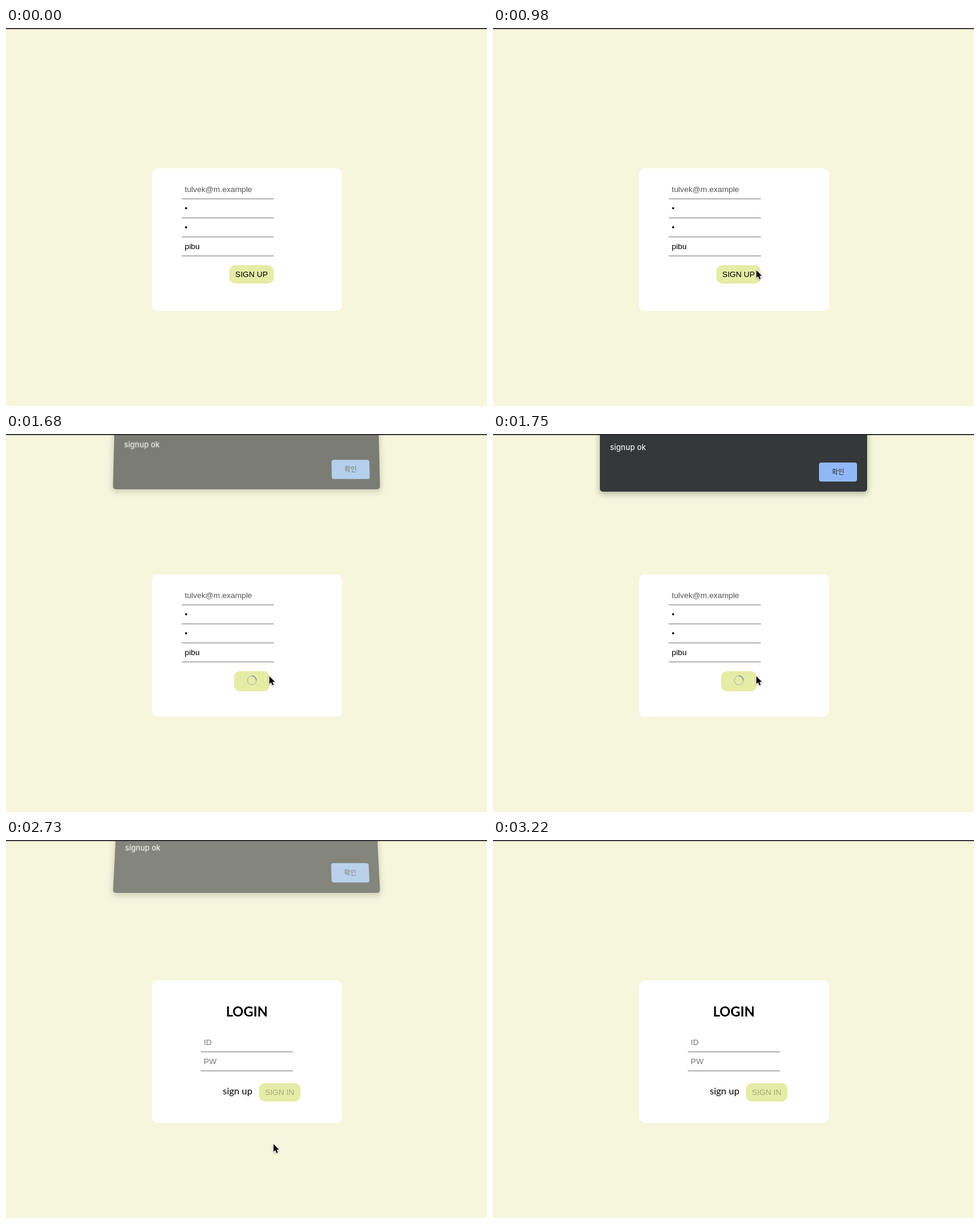
An HTML page for the animation above (4.06 s loop, 810 by 636 pixels).

```html
<!DOCTYPE html>
<html lang="ko">
<head>
<meta charset="utf-8">
<title>Sign up</title>
<style>
  html, body { margin: 0; width: 100%; height: 100%; overflow: hidden; background: #f6f6dc; }
  body { position: relative; }
  svg { position: absolute; left: 0; top: 0; display: block; }
  text { font: 13.333px "Liberation Sans", Arial, sans-serif; white-space: pre; }

  .line { fill: #767676; }
  .btn { fill: #e5eca6; }
  .muted { fill: #545454; }
  .hint { fill: #757575; }
  .off { fill: #a5aa7a; }
  .title { font: 700 22.7px Lato, sans-serif; text-anchor: middle; }
  .link { font: 16px Lato, sans-serif; }

  /* One tick is 70 ms, 58 ticks per loop */
  .signup, .login, .idle, .busy, .turn, .dialog, .cursor {
    animation: 4060ms step-end infinite;
  }
  .signup { animation-name: leave-page; }
  .login { animation-name: enter-page; }
  .idle { animation-name: leave-idle; }
  .busy { animation-name: enter-busy; }
  .turn { animation-name: turn; transform-origin: 414px 414.5px; }
  .dialog { animation-name: dialog; }
  .cursor { animation-name: cursor; }

  @keyframes leave-page { 0% { opacity: 1 } 67.24%, 100% { opacity: 0 } }
  @keyframes enter-page { 0% { opacity: 0 } 67.24%, 100% { opacity: 1 } }
  @keyframes leave-idle { 0% { opacity: 1 } 37.93%, 100% { opacity: 0 } }
  @keyframes enter-busy { 0% { opacity: 0 } 37.93%, 100% { opacity: 1 } }
  @keyframes turn { 0% { transform: rotate(-25deg) } 39.65%, 100% { transform: none } }

  .dialog {
    position: absolute; left: 180px; top: -30px; width: 450px; height: 127px;
    border-radius: 0 0 5px 5px;
    background: #282b2e;
    box-shadow: 0 3px 10px 2px rgba(0, 0, 0, .24);
    transform-origin: 50% 100%;
    --tilt: translateY(-8px) perspective(230px) rotateX(3deg) scaleY(1.035);
    --tilt-in: translateY(-4px) perspective(230px) rotateX(1.5deg) scaleY(1.017);
    --tilt-out: translateY(-14px) perspective(230px) rotateX(5deg) scaleY(1.06);
  }
  .dialog span {
    position: absolute; left: 17px; top: 42px;
    font: 500 13px/20px Inter, sans-serif; color: #e8eaed;
  }
  .dialog b {
    position: absolute; left: 369px; top: 78px; width: 64px; height: 32px;
    border-radius: 4px; background: #8ab4f8; color: #202124; text-align: center;
    font: 500 11.5px/31px "Noto Sans CJK KR", "Noto Sans CJK", sans-serif;
  }
  @keyframes dialog {
    0% { opacity: 0; transform: var(--tilt) }
    41.37% { opacity: .6; transform: var(--tilt-in) }
    43.1% { opacity: .94; transform: none }
    44.82% { opacity: .99; transform: none }
    46.55% { opacity: 1; transform: none }
    67.24% { opacity: .56; transform: var(--tilt) }
    68.96% { opacity: .12; transform: var(--tilt-out) }
    70.68%, 100% { opacity: 0; transform: var(--tilt-out) }
  }

  .cursor { filter: drop-shadow(0 1px 1px rgba(0, 0, 0, .3)); overflow: visible; }
  @keyframes cursor {
    0% { transform: translate(391px, 660px) }
    6.89% { transform: translate(391px, 610px) }
    8.62% { transform: translate(398px, 545px) }
    10.34% { transform: translate(412px, 478px) }
    12.06% { transform: translate(427px, 432px) }
    13.79% { transform: translate(438px, 411px) }
    15.51% { transform: translate(443px, 407px) }
    53.44% { transform: translate(443px, 410px) }
    55.17% { transform: translate(444px, 428px) }
    56.89% { transform: translate(446px, 458px) }
    58.62% { transform: translate(448px, 490px) }
    60.34% { transform: translate(449px, 507px) }
    62.06% { transform: translate(450px, 511px) }
    70.68% { transform: translate(450px, 514px) }
    72.41% { transform: translate(449px, 526px) }
    74.13% { transform: translate(447px, 551px) }
    75.86% { transform: translate(445px, 583px) }
    77.58% { transform: translate(443px, 618px) }
    79.31%, 100% { transform: translate(442px, 660px) }
  }
</style>
</head>
<body>
<svg width="810" height="636" viewBox="0 0 810 636">
  <rect width="810" height="1" fill="#303034"/>
  <rect y="1" width="810" height="1" fill="#4a4a48"/>
  <rect x="246" y="236" width="320" height="240" rx="10" fill="#fff"/>

  <g class="signup">
    <text class="muted" x="301" y="276">tulvek@m.example</text>
    <text x="301" y="308">•</text>
    <text x="301" y="340">•</text>
    <text x="301" y="372">pibu</text>
    <g class="line">
      <rect x="296" y="287" width="155" height="1"/>
      <rect x="296" y="319" width="155" height="1"/>
      <rect x="296" y="351" width="155" height="1"/>
      <rect x="296" y="383" width="155" height="1"/>
    </g>
    <g class="idle">
      <rect class="btn" x="376" y="399" width="75" height="31" rx="10"/>
      <text x="386" y="419">SIGN UP</text>
    </g>
    <g class="busy">
      <rect class="btn" x="384" y="399" width="60" height="34" rx="10"/>
      <g class="turn" fill="none">
        <circle cx="414" cy="414.5" r="7.5" stroke="#a9ad9c"/>
        <path d="M414 407a7.5 7.5 0 0 1 7.5 7.5" stroke="#4f74b8" stroke-width="1.2"/>
      </g>
    </g>
  </g>

  <g class="login">
    <text class="title" x="405.5" y="297">LOGIN</text>
    <text class="hint" x="333" y="345">ID</text>
    <text class="hint" x="333" y="377">PW</text>
    <g class="line">
      <rect x="328" y="356" width="155" height="1"/>
      <rect x="328" y="388" width="155" height="1"/>
    </g>
    <text class="link" x="365" y="428">sign up</text>
    <rect class="btn" x="426" y="409" width="70" height="31" rx="10"/>
    <text class="off" x="436" y="429">SIGN IN</text>
  </g>
</svg>

<div class="dialog"><span>signup ok</span><b>확인</b></div>

<svg class="cursor" width="12" height="18" viewBox="0 0 12 18">
  <path d="M.5.5V13.6l3-2.8 2.1 4.9 2.2-1-2.1-4.7h4.1z" stroke="#fff" stroke-width="1.6" paint-order="stroke"/>
</svg>
</body>
</html>
```
